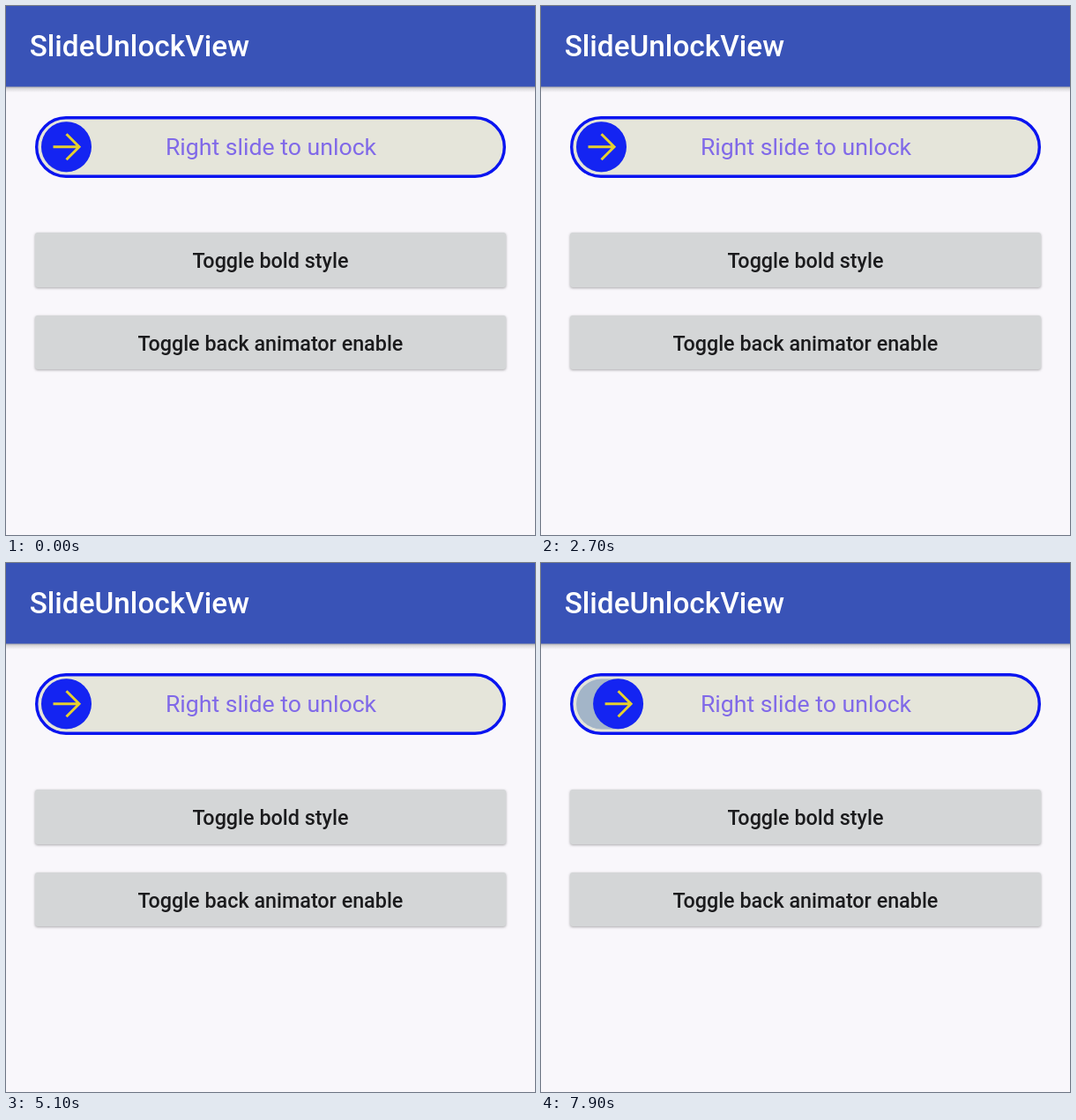
Write an HTML page that moves like this. It is 600 by 600 pixels and loops after 8 s.

```html
<!DOCTYPE html>
<html lang="en">
<head>
<meta charset="utf-8">
<title>Slide to unlock</title>
<style>
  html, body { margin: 0; width: 100%; height: 100%; overflow: hidden; background: #f9f7fb; }
  svg { display: block; width: 100%; height: 100%; font-family: Roboto, sans-serif; }
  .button rect { fill: #d4d6d7; }
  .button .face { filter: drop-shadow(0 1.5px 1.5px rgba(0, 0, 0, .32)); }
  .button text { font-size: 23.33px; font-weight: 500; fill: #1b1b1d; text-anchor: middle; }
</style>
</head>
<body>
<svg viewBox="0 0 600 600">
  <defs>
    <linearGradient id="barShadow" x2="0" y2="1">
      <stop stop-color="#000" stop-opacity=".34"/>
      <stop offset=".4" stop-color="#000" stop-opacity=".12"/>
      <stop offset="1" stop-color="#000" stop-opacity="0"/>
    </linearGradient>
    <radialGradient id="touchFill">
      <stop stop-color="#fff" stop-opacity=".8"/>
      <stop offset=".8" stop-color="#fafaff" stop-opacity=".9"/>
      <stop offset="1" stop-color="#e4e6f8" stop-opacity=".9"/>
    </radialGradient>
    <clipPath id="clip0"><rect x="33" y="257" width="534" height="62" rx="3"/></clipPath>
    <clipPath id="clip1"><rect x="33" y="351" width="534" height="61" rx="3"/></clipPath>
  </defs>

  <rect width="600" height="600" fill="#f9f7fb"/>
  <rect y="91" width="600" height="7" fill="url(#barShadow)"/>
  <rect width="600" height="91.5" fill="#3953b7"/>
  <text x="26.7" y="57" font-size="33.33" font-weight="500" fill="#fff">SlideUnlockView</text>

  <rect x="34.7" y="126.7" width="530.6" height="66.6" rx="33.3" fill="#e5e5da" stroke="#0a14f0" stroke-width="3.4"/>
  <text id="label" x="300.5" y="168.5" font-size="26.67" text-anchor="middle" fill="#8069e8" stroke="#8069e8" stroke-width="0">Right slide to unlock</text>
  <rect id="fill" x="40" y="131.5" height="57" rx="28.5" fill="#a3b5c8"/>
  <g id="knob">
    <circle id="halo" r="33" fill="#4d70d8" fill-opacity=".55"/>
    <circle r="28.5" fill="#1424f2"/>
    <path d="M-15 0H14M0-14.5L14.5 0L0 14.5" fill="none" stroke="#e6d02e" stroke-width="3"/>
  </g>

  <g class="button">
    <rect class="face" x="33" y="257" width="534" height="62" rx="3"/>
    <circle id="ripple0" clip-path="url(#clip0)" cx="310" cy="297"/>
    <text x="300" y="297">Toggle bold style</text>
  </g>
  <g class="button">
    <rect class="face" x="33" y="351" width="534" height="61" rx="3"/>
    <circle id="ripple1" clip-path="url(#clip1)" cx="320" cy="395"/>
    <text x="300" y="390.5">Toggle back animator enable</text>
  </g>

  <circle id="touch" r="18" fill="url(#touchFill)" stroke="#b4b9dc" stroke-opacity=".6" stroke-width="2"/>
</svg>
<script>
const LOOP = 8000, STEP = 100, HOME = 68.5;
const GRAB = 11, LAG = 50;
const RETURN_START = 7640, RETURN_TIME = 300;

const el = id => document.getElementById(id);
const clamp = v => Math.min(1, Math.max(0, v));
const set = (node, attrs) => {
  for (const name in attrs) node.setAttribute(name, attrs[name]);
};

// Linear interpolation through [time, value] points.
function along(points, t) {
  if (t <= points[0][0]) return points[0][1];
  for (let i = 1; i < points.length; i++) {
    const [t0, a] = points[i - 1], [t1, b] = points[i];
    if (t <= t1) return a + (b - a) * (t - t0) / (t1 - t0);
  }
  return points[points.length - 1][1];
}

const drags = [
  { start: 3800, end: 4700,
    x: [[3800, 79], [3950, 100], [4150, 206], [4350, 306], [4400, 331], [4600, 521], [4700, 527]],
    y: [[3800, 166], [4400, 178], [4600, 187]] },
  { start: 6800, end: 7700,
    x: [[6800, 79], [6900, 86], [6950, 100], [7000, 101], [7100, 150], [7500, 480], [7600, 521]],
    y: [[6800, 166], [7000, 167], [7600, 182]] }
];

const taps = [
  { button: 0, start: 700, end: 1000, x: 310, y: 297 },
  { button: 0, start: 1900, end: 2200, x: 310, y: 297 },
  { button: 1, start: 5600, end: 5900, x: 320, y: 395 }
];
const miss = { start: 3000, end: 3500, x: 180, y: 169.5 };

const during = (event, t) => t >= event.start && t < event.end;

function drawRipple(button, t) {
  const tap = taps.find(p => p.button === button && t >= p.start && t < p.end + 400);
  const ripple = el('ripple' + button);
  if (!tap) return set(ripple, { r: 0 });
  const grow = clamp((t - tap.start + 50) / 350);
  const fade = 1 - clamp((t - tap.end) / 400);
  set(ripple, { r: 340 * grow, 'fill-opacity': .14 * fade });
}

function drawTouch(t, drag) {
  const tap = taps.find(p => during(p, t));
  let opacity = 0, x = 0, y = 0;
  if (drag) {
    x = along(drag.x, t);
    y = along(drag.y, t);
    opacity = along([[0, .6], [200, .6], [500, .92]], t - drag.start);
  } else if (tap) {
    ({ x, y } = tap);
    opacity = .8;
  } else if (during(miss, t)) {
    ({ x, y } = miss);
    opacity = .55;
  }
  set(el('touch'), { cx: x, cy: y, opacity });
}

function knobPosition(t, drag) {
  if (drag) return Math.max(HOME, along(drag.x, t - LAG) - GRAB);
  if (t < RETURN_START) return HOME;
  const p = clamp((t - RETURN_START) / RETURN_TIME);
  return HOME + (510 - HOME) * (1 + Math.cos(Math.PI * p)) / 2;
}

function draw(t) {
  const drag = drags.find(d => during(d, t));
  const x = knobPosition(t, drag);
  set(el('knob'), { transform: `translate(${x} 159.7)` });
  set(el('halo'), { visibility: drag ? 'visible' : 'hidden' });
  set(el('fill'), { width: x + 28 - 40 });
  set(el('label'), { 'stroke-width': t >= 1000 && t < 2200 ? .9 : 0 });
  drawRipple(0, t);
  drawRipple(1, t);
  drawTouch(t, drag);
}

const origin = performance.now();
function tick() {
  const t = (performance.now() - origin) % LOOP;
  draw(Math.floor(t / STEP) * STEP);
  requestAnimationFrame(tick);
}
tick();
</script>
</body>
</html>
```
